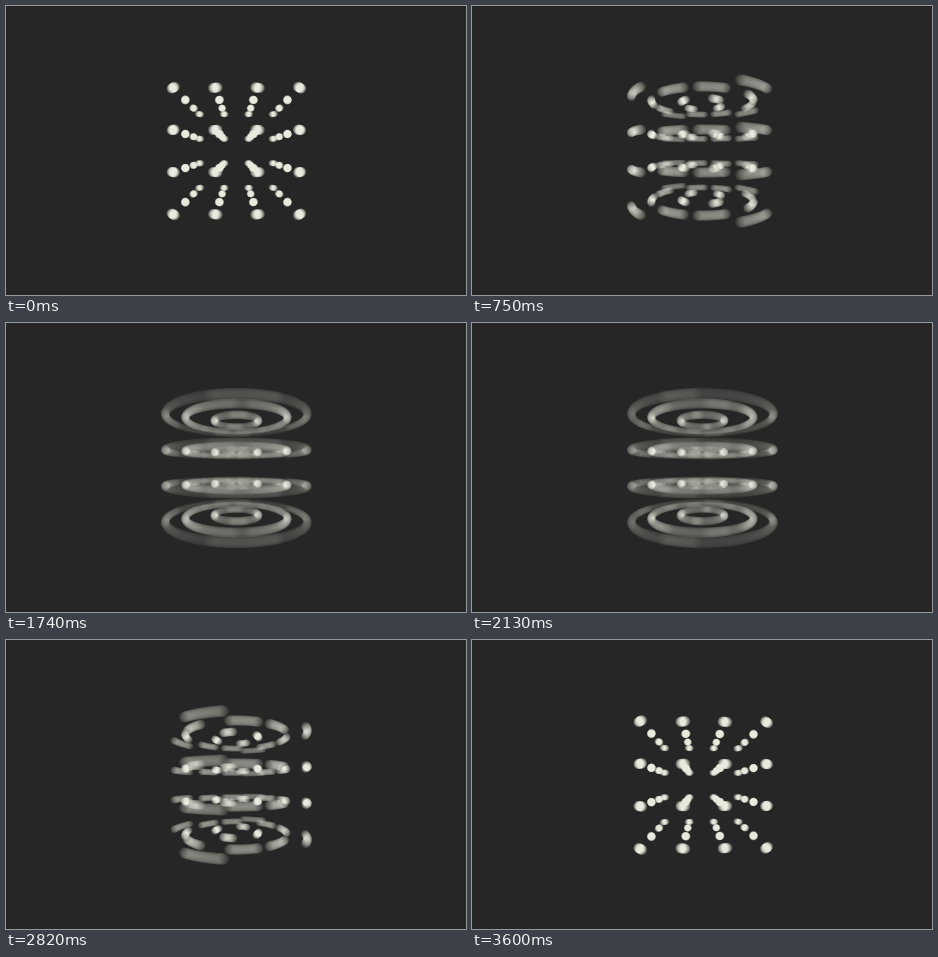
Write an HTML page with a canvas that moves like this. It is 460 by 289 pixels and loops after 3.63 s.

```html
<!DOCTYPE html>
<html lang="en">
<head>
<meta charset="utf-8">
<title>Spinning lattice</title>
<style>
  html, body { margin: 0; width: 100%; height: 100%; overflow: hidden; background: #262626; }
  canvas { display: block; width: 460px; height: 289px; }
</style>
</head>
<body>
<canvas id="stage" width="460" height="289"></canvas>
<script>
const LOOP = 3630, STEP = 30, SHUTTER = 105;
const CX = 230.4, CY = 145, FOCAL = 176.4, CAMERA = 5.68, DOT = 0.118;
const BACK = [38, 38, 38], INK = [233, 233, 222];

// Half of the spin: time in ms, angle in degrees, speed in degrees per ms.
const SPIN = [
  [0, 0, 0.04],
  [510, 48.5, 0.165],
  [750, 100, 0.25],
  [1110, 216, 0.5],
  [1260, 307, 0.75],
  [1815, 900, 1.3]
];

// Only this box of the stage ever changes.
const X0 = 150, Y0 = 60, W = 162, H = 170;
const ctx = document.getElementById('stage').getContext('2d');
const image = ctx.createImageData(W, H);
const mask = new Float32Array(W * H);
const light = new Float32Array(W * H);

const rows = [-1.5, -0.5, 0.5, 1.5];
const columns = rows.flatMap(x => rows.map(z => ({
  radius: Math.hypot(x, z),
  angle: Math.atan2(x, z)
})));

function halfSpin(t) {
  let i = 0;
  while (i < SPIN.length - 2 && t > SPIN[i + 1][0]) i++;
  const [t0, a0, v0] = SPIN[i], [t1, a1, v1] = SPIN[i + 1];
  const d = t1 - t0, u = (t - t0) / d, w = 1 - u;
  return a0 * w * w * (1 + 2 * u) + a1 * u * u * (3 - 2 * u)
    + d * u * w * (v0 * w - v1 * u);
}

// The second half mirrors the first, so the spin slows down again.
function spin(t) {
  if (t < 0) return -halfSpin(-t);
  if (t > LOOP) return 1800 + halfSpin(t - LOOP);
  return t <= LOOP / 2 ? halfSpin(t) : 1800 - halfSpin(LOOP - t);
}

function stamp(cx, cy, r) {
  const left = Math.max(0, Math.floor(cx - r - 1));
  const right = Math.min(W - 1, Math.ceil(cx + r + 1));
  const top = Math.max(0, Math.floor(cy - r - 1));
  const bottom = Math.min(H - 1, Math.ceil(cy + r + 1));
  for (let y = top; y <= bottom; y++) {
    for (let x = left; x <= right; x++) {
      const dx = x + 0.5 - cx, dy = y + 0.5 - cy;
      const cover = Math.min(1, r + 0.5 - Math.sqrt(dx * dx + dy * dy));
      const i = y * W + x;
      if (cover > mask[i]) mask[i] = cover;
    }
  }
}

function expose(degrees) {
  mask.fill(0);
  const turn = degrees * Math.PI / 180;
  for (const { radius, angle } of columns) {
    const a = angle - turn;
    const scale = FOCAL / (CAMERA - radius * Math.cos(a));
    const x = CX - X0 + radius * Math.sin(a) * scale;
    for (const row of rows) stamp(x, CY - Y0 + row * scale, DOT * scale);
  }
  for (let i = 0; i < light.length; i++) light[i] += mask[i];
}

function draw(t) {
  const from = t - SHUTTER / 2;
  const sweep = spin(from + SHUTTER) - spin(from);
  const count = Math.ceil(10 + sweep / 1.3);
  light.fill(0);
  for (let i = 0; i < count; i++) expose(spin(from + SHUTTER * (i + 0.5) / count));

  const px = image.data;
  for (let i = 0; i < light.length; i++) {
    const k = light[i] / count;
    for (let c = 0; c < 3; c++) {
      px[i * 4 + c] = Math.sqrt(BACK[c] ** 2 * (1 - k) + INK[c] ** 2 * k);
    }
    px[i * 4 + 3] = 255;
  }
  ctx.putImageData(image, X0, Y0);
}

ctx.fillStyle = '#262626';
ctx.fillRect(0, 0, 460, 289);

const start = performance.now();
let shown = -1;
function tick() {
  const t = Math.floor((performance.now() - start) % LOOP / STEP) * STEP;
  if (t !== shown) draw(shown = t);
  requestAnimationFrame(tick);
}
tick();
</script>
</body>
</html>
```
